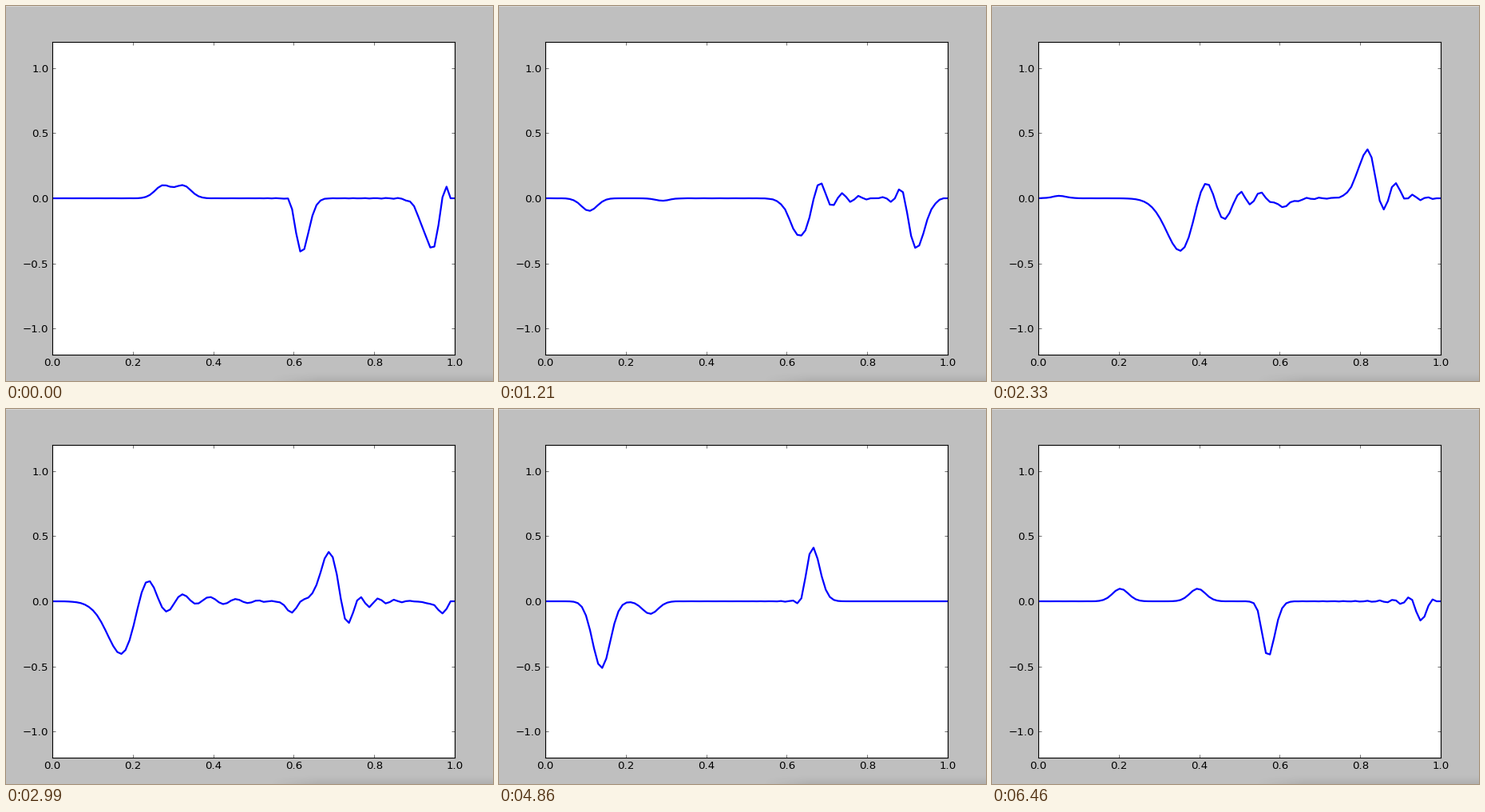
These frames come from a looping animation (610 by 470 pixels, 6560 ms). A matplotlib script:

```python
import numpy as np
import matplotlib.pyplot as plt
from matplotlib.animation import FuncAnimation

W, H, DPI = 610, 470, 80
TICK, LOOP = 20, 6560
STEPS, NODES, WALL = 200, 100, 98

# The playback speed drifts: (time in ms, simulation step) key points.
KEYS = [(0, 97), (1210, 140), (2330, 174), (2990, 192),
        (3420, 207), (4050, 222), (5650, 265), (6460, 290)]
key_times, key_steps = np.transpose(KEYS)


def simulate(x):
    """Leapfrog wave equation on a string with a slower right half."""
    courant2 = np.where(x < 0.5, 1.0, 0.5)[1:WALL]
    pulse = np.exp(-1000 * (x - 0.3) ** 2)
    waves = [pulse, pulse]
    while len(waves) < STEPS:
        old, now = waves[-2:]
        new = np.zeros_like(now)
        bend = now[2:WALL + 1] - 2 * now[1:WALL] + now[:WALL - 1]
        new[1:WALL] = 2 * now[1:WALL] - old[1:WALL] + courant2 * bend
        waves.append(new)
    return waves


def step_at(ms):
    """Simulation step on screen; each redraw advances two steps."""
    start = key_steps[np.searchsorted(key_times, ms, side="right") - 1]
    done = np.interp(ms, key_times, key_steps) - start
    return int(start + 2 * (done // 2)) % STEPS


def draw_window(fig):
    """Light top edge and the soft shadow at the bottom right."""
    back = fig.add_axes([0, 0, 1, 1], zorder=-1)
    back.axis("off")
    x, y = np.meshgrid(np.arange(330, W), np.arange(458, H))
    shade = np.zeros(x.shape + (4,))
    shade[..., 3] = (0.08 * np.clip((x - 330) / 60, 0, 1)
                     * ((y - 457) / 12) ** 1.5)
    back.imshow(shade, extent=(330, W, H, 458), aspect="auto")
    back.fill_between([0, W], 0, 1, color="#d6d6d6", lw=0)
    back.set(xlim=(0, W), ylim=(H, 0))


def draw_axes(fig):
    ax = fig.add_axes([58 / W, 33 / H, 504 / W, 392 / H])
    ax.set(xlim=(0, 1), ylim=(-1.2, 1.2),
           xticks=np.linspace(0, 1, 6), yticks=np.linspace(-1, 1, 5))
    ax.xaxis.set_major_formatter("{x:.1f}")
    ax.yaxis.set_major_formatter(
        lambda v, _: f"{v:.1f}".replace("-", "\u2212"))
    ax.tick_params(direction="in", length=4, width=0.5, pad=4,
                   top=True, right=True, labelsize=12)
    for spine in ax.spines.values():
        spine.set_linewidth(1)
    return ax


plt.rcParams["font.family"] = "DejaVu Sans"
fig = plt.figure(figsize=(W / DPI, H / DPI), dpi=DPI, facecolor="#bfbfbf")
draw_window(fig)
ax = draw_axes(fig)

grid = np.linspace(0, 1, NODES)
waves = simulate(grid)
line, = ax.plot(grid, waves[0], color="#0000ff", lw=2)


def update(i):
    line.set_ydata(waves[step_at(i * TICK + TICK / 2)])
    return line,


anim = FuncAnimation(fig, update, frames=LOOP // TICK, interval=TICK,
                     repeat=True, repeat_delay=0)
plt.show()
```
